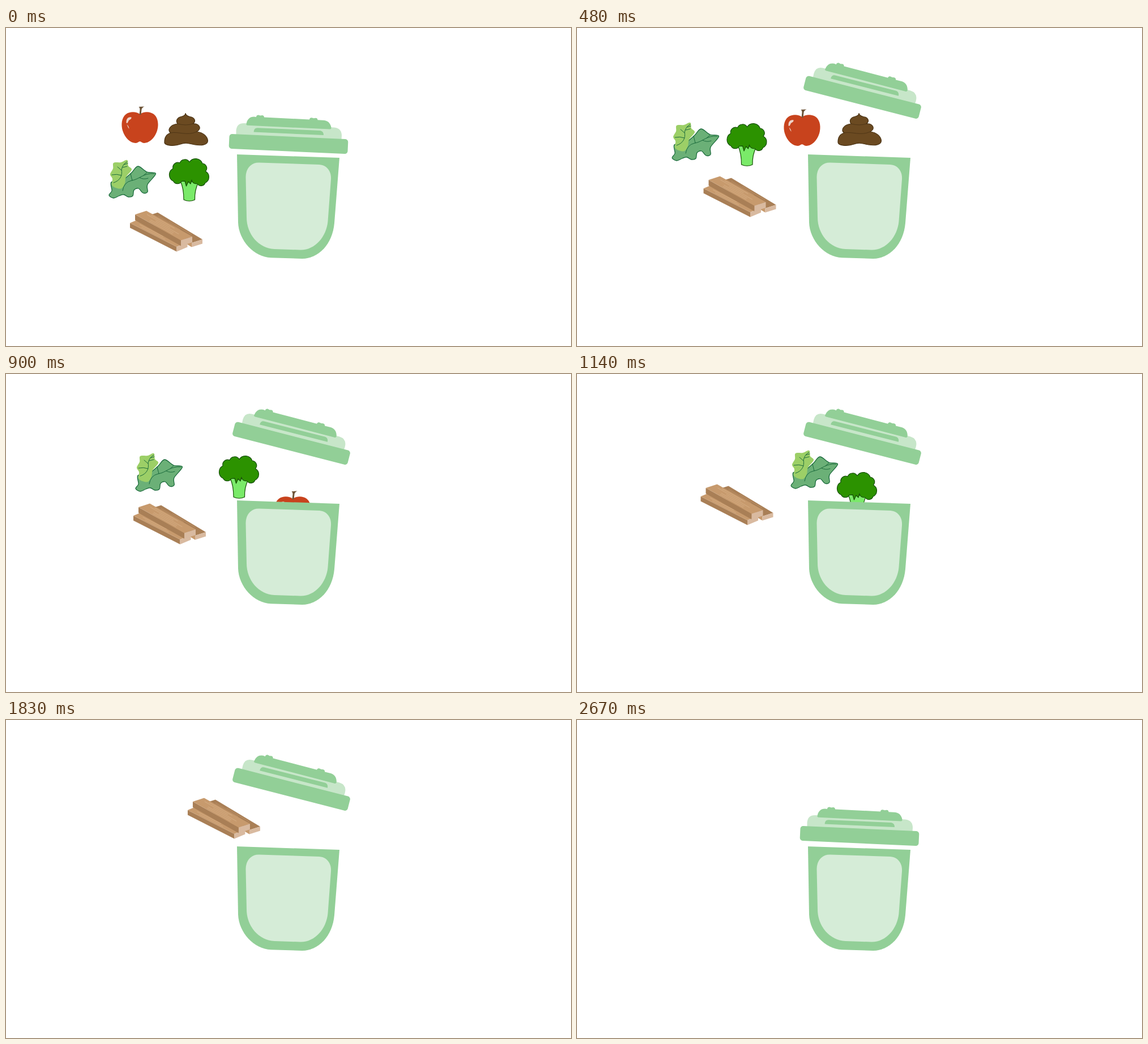
These frames come from a looping animation (998 px wide and 561 px high, 2700 ms). An HTML page:

```html
<!DOCTYPE html>
<html lang="en">
<head>
<meta charset="utf-8">
<title>Compost bin</title>
<style>
html, body { margin: 0; width: 100%; height: 100%; overflow: hidden; background: #fff; }
svg { display: block; width: 100vw; height: 100vh; }
.line { fill: none; stroke-linecap: round; }
</style>
</head>
<body>
<svg viewBox="0 0 998 561">
  <g id="wood"></g>
  <g id="lettuce" stroke="#1b6b3c">
    <path id="leaf" fill="#6bb077" stroke-width="1.3"/>
    <path class="line" d="M206 287Q208 272 222 269C236 267 243 255 262 257M223 269L220 257M236 264Q243 268 251 265M243 260L249 255"/>
    <path id="sprout" fill="#9ccf67" stroke="none"/>
    <path class="line" d="M190 273C202 269 206 260 204 250Q206 240 214 236M204 251L197 245M204 260Q196 257 187 259M206 246L214 244M208 241L215 239"/>
  </g>
  <g id="broccoli" stroke="#154f05" stroke-width="1.2" stroke-linejoin="round">
    <path fill="#7aea69" d="M308 270Q314 283 314 303Q324 307.500 333.500 303Q333 286 340 272Z"/>
    <path id="head" fill="#2c9200"/>
  </g>
  <g id="apple" fill="#c8431d">
    <path id="half" d="M236 152.500C243 147 254 147 261 152C269 158 270 171 267 181C263 194 253 203 244 203C240 203 239 200 236 200Z"/>
    <use href="#half" transform="translate(473 0) scale(-1 1)"/>
    <path fill="#6d5438" d="M235.500 153L236.500 144Q236.500 140.500 234.500 139L244.500 138.500Q240 140.500 239.500 144L238.500 153Z"/>
    <path fill="#eed3c8" d="M212.500 167C212 160 216 156 221.500 157.500C222 162 217 161 216 165C215 168 213 169 212.500 167ZM213.500 170Q215 175 217.500 178Q217 173 213.500 170Z"/>
  </g>
  <g id="heap" stroke="#4a3213" stroke-linejoin="round">
    <path fill="#6b4a21" stroke-width="1.2" d="M317 150.500Q318 155 325 156.500C334 158 336 165 330 169C341 168 347 177 337 183C348 184 356 191 356.500 199C356 206 346 208 334 206C320 203 316 202 308 205C297 209 279 208 280 201C280 193 284 187 291 185C285 181 288 171 303 169C299 163 303 158 309 156.500Q317 155 317 150.500Z"/>
    <path class="line" stroke-width=".8" d="M303 169Q318 173 330 169M291 185C304 182 320 191 337 183"/>
  </g>
  <path fill="#92cf97" d="M408 223L589 229L580 344C577 381 552 407 523 407L468 405.300C438 404 411 375 410 343Z"/>
  <path fill="#d5ecd7" d="M423.500 263C423.500 248 433 237 447 237.500L553 241C566 241.500 575 252 574 267L568.500 341C566 368 546 392 520 391.500L474 390C447 389 425 364 425 334Z"/>
  <g id="lid" fill="#92cf97">
    <path fill="#c7e6c9" d="M406.500 190V181Q407.500 168 420 168L580 175.500Q593 177 593 190L592.500 198Z"/>
    <path d="M424.500 169Q427 156.500 438 156.500L442 157Q442 153.500 446 153.500L449 154.500L453 154Q456 154.500 456 157.500L536 161.500Q536.500 158 540 158.300L543.500 159.200L547 158.700Q550.500 159 550.500 162.300L560 162.700Q572 163 574.500 175.500Q575 178.700 572 178.600L427 171.700Q424 171.500 424.500 169Z"/>
    <path d="M437.500 183.500Q438 176.300 444 176.300L555 181Q561 182 561 189Z"/>
    <rect x="394" y="191.500" width="210" height="26" rx="5" transform="rotate(2.6 499 204.5)"/>
  </g>
</svg>
<script>
const LOOP = 2700, STEP = 30;
const el = id => document.getElementById(id);
const clamp = v => Math.max(0, Math.min(1, v));
const smooth = v => v * v * (3 - 2 * v);
const points = text => text.split(" ").map(p => p.split(",").map(Number));

// Closed smooth curve through the points
function blob(text) {
  const pts = points(text), n = pts.length, pick = i => pts[(i + n) % n];
  const ctrl = (i, sign) => [0, 1].map(k => pick(i)[k] + sign * (pick(i + 1)[k] - pick(i - 1)[k]) / 6);
  return "M" + pts[0] + pts.map((p, i) => `C${ctrl(i, 1)} ${ctrl(i + 1, -1)} ${pick(i + 1)}`).join("") + "Z";
}

// Chain of round bumps, one between each two points
function bumps(text) {
  const pts = points(text);
  return "M" + pts[0] + pts.slice(1).map((p, i) => {
    const r = 0.56 * Math.hypot(p[0] - pts[i][0], p[1] - pts[i][1]);
    return `A${r} ${r} 0 0 1 ${p}`;
  }).join("");
}

let seed = 7;
const random = () => (seed = seed * 16807 % 2147483647) / 2147483647;

// Board with its near corner at x, y: length u, width v, height h
function plank(x, y, u, v, h, top, side, grain) {
  const at = (a, b, c = 0) => [x + a * u[0] + b * v[0], y + a * u[1] + b * v[1] + c * h];
  const face = (fill, ...pts) => `<path fill="${fill}" d="M${pts.join("L")}Z"/>`;
  let lines = "";
  for (let i = 0; i < 5; i++) {
    const a = random() * 0.4, b = (i + 1) / 6;
    lines += `M${at(a, b)}L${at(a + 0.5, b)}`;
  }
  return face(side, at(0, 0), at(1, 0), at(1, 0, 1), at(0, 0, 1))
    + face(top, at(0, 0), at(0, 1), at(1, 1), at(1, 0))
    + face("#d9baa0", at(1, 0), at(1, 1), at(1, 1, 1), at(1, 0, 1))
    + `<path class="line" stroke="${grain}" stroke-width=".7" d="${lines}"/>`;
}

const tan = "#c79a6d", brown = "#a97f56", pale = "#dcb78f";
el("wood").innerHTML =
  plank(249, 331.5, [79, 47.5], [19, -6], 7.5, brown, tan, tan) +
  plank(219, 344, [82.5, 42], [19, -8], 8.5, tan, brown, pale) +
  plank(228, 329, [81, 45.5], [20, -6.5], 10, tan, brown, pale);

el("leaf").setAttribute("d", blob("186,272 187,287 182,295 190,300 200,296 208,294 216,298 224,296 226,286 234,283 242,291 250,289 250,276 264.5,257 249,254 233,244 221,256 203,270"));
el("sprout").setAttribute("d", blob("214,233 203,237 190,238 189,248 184,258 188,266 187,277 194,282 204,283 210,274 212,263 222,250 216,243"));
el("head").setAttribute("d", bumps("310,270.5 295.5,270 295,248 307,238 324,236.5 347,239 352.5,253 352,273 338,275")
  + "Q329 275 328 268L326 275L322 271L318.500 279L316 270Z");

// Offsets of each item at the shared beats; the last one lies behind the bin
const beats = [0, 480, 900, 1140, 1530, 1740, 1980, 2160];
const paths = {
  heap: "0,0 181,0 190,110",
  apple: "0,0 161,5 270,68 274,140",
  broccoli: "0,0 -23.5,-62 88,-86 171,-57 180,60",
  lettuce: "0,0 -14,-66 47,-93 196,-98 291,-10 295,40",
  wood: "0,0 4.5,-61 6,-94 -0.5,-128 7,-181 50,-193 195,-157 222,-88"
};
for (const id in paths) paths[id] = points(paths[id]);

function slope(stops, i, axis) {
  const a = Math.max(0, i - 1), b = Math.min(stops.length - 1, i + 1);
  return (stops[b][axis] - stops[a][axis]) / (beats[b] - beats[a]);
}

function at(stops, t, axis) {
  const last = stops.length - 1;
  if (t >= beats[last]) return stops[last][axis];
  const i = beats.findIndex(b => b > t) - 1;
  const d = beats[i + 1] - beats[i], u = (t - beats[i]) / d, v = 1 - u;
  return smooth(v) * stops[i][axis] + smooth(u) * stops[i + 1][axis]
    + d * u * v * (v * slope(stops, i, axis) - u * slope(stops, i + 1, axis));
}

function draw(t) {
  for (const id in paths) {
    el(id).setAttribute("transform", `translate(${at(paths[id], t, 0)} ${at(paths[id], t, 1)})`);
  }
  const open = smooth(clamp(t / 150)) * (1 - clamp((t - 2610) / 60));
  el("lid").setAttribute("transform",
    `translate(${5 * open} ${-82.2 * open}) rotate(${11.8 * open} 499 204.5)`);
}

const start = performance.now();
function tick() {
  const t = (performance.now() - start) % LOOP;
  draw(Math.floor(t / STEP) * STEP);
  requestAnimationFrame(tick);
}
tick();
</script>
</body>
</html>
```
